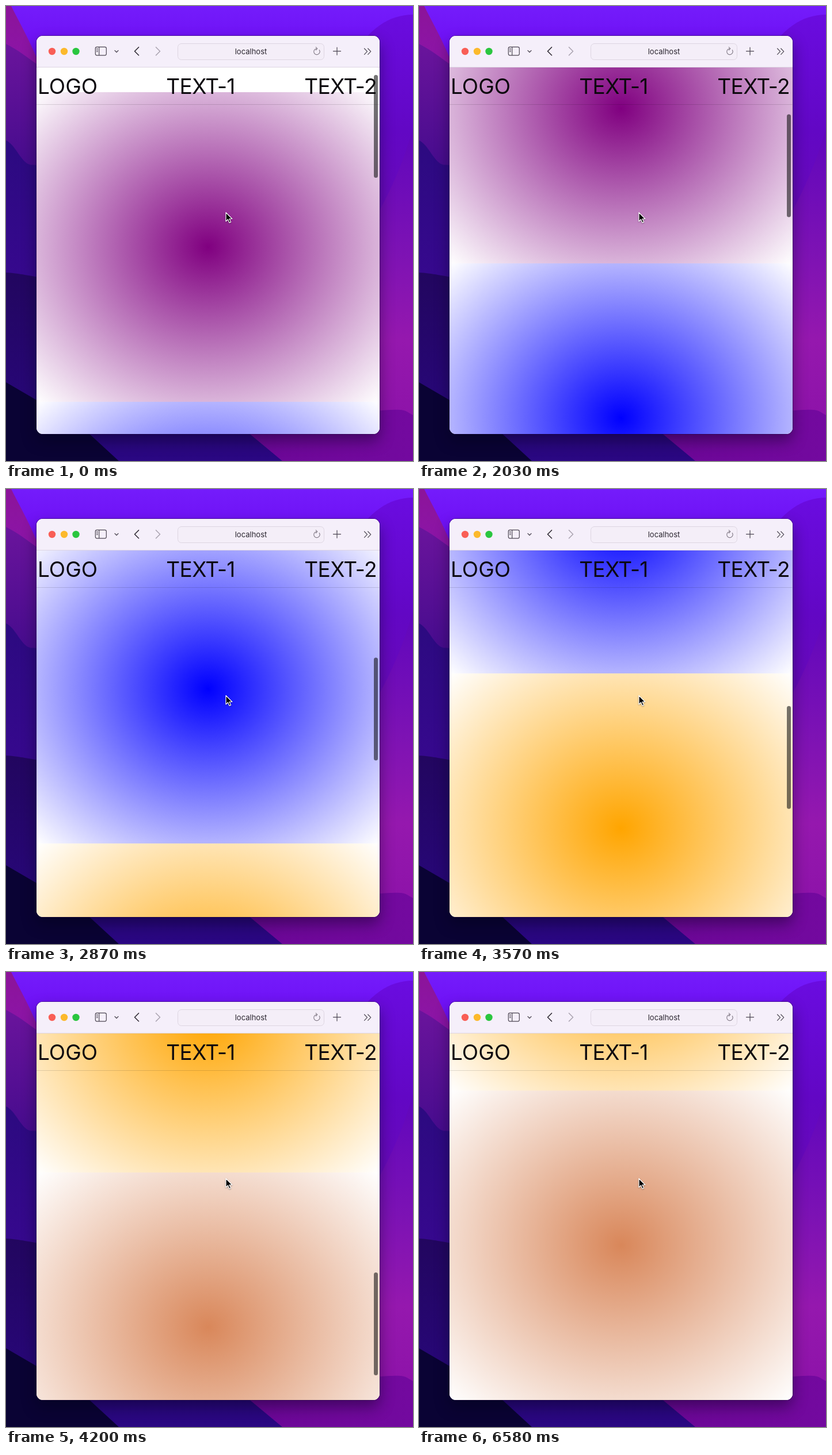
Animation of 707 by 792 pixels, one loop 6.65 s. Source, as an HTML page:

```html
<!DOCTYPE html>
<html lang="en">
<head>
<meta charset="utf-8">
<title>Sticky header scroll</title>
<style>
  html, body { margin: 0; width: 100%; height: 100%; overflow: hidden; background: #3a0898; }
  #stage { position: absolute; left: 0; top: 0; width: 707px; height: 792px; overflow: hidden; }
  svg { position: absolute; left: 0; top: 0; display: block; }
  #window {
    position: absolute; left: 53px; top: 52px; width: 595.5px; height: 693px;
    border-radius: 11px; overflow: hidden; background: #fff;
  }
  #shadow {
    position: absolute; left: 53px; top: 52px; width: 595.5px; height: 693px; border-radius: 11px;
    box-shadow: 0 0 0 1px rgba(20, 0, 50, .4), 0 12px 26px rgba(0, 0, 20, .42);
  }
  #view { position: absolute; left: 0; top: 55px; width: 100%; height: 638px; overflow: hidden; }
  #page { position: absolute; left: 0; top: 43px; width: 100%; will-change: transform; }
  #page div { height: 538.5px; background: radial-gradient(var(--c), #fff); }
  #bar { position: absolute; left: 0; top: 0; width: 100%; height: 54px; background: #f5effa; border-bottom: 1px solid #ddd5e2; }
  #thumb {
    position: absolute; left: 639px; top: 120px; width: 7px; height: 178.5px;
    border-radius: 3.5px; background: rgba(10, 10, 10, .56);
  }
  text { font-family: Inter, Roboto, "Liberation Sans", sans-serif; }
</style>
</head>
<body>
<div id="stage">
  <svg width="707" height="792">
    <defs>
      <linearGradient id="sky" x2="0" y2="1">
        <stop offset="0" stop-color="#741cfb"/><stop offset=".12" stop-color="#6c0bf2"/>
        <stop offset=".5" stop-color="#5c05b8"/><stop offset="1" stop-color="#38057e"/>
      </linearGradient>
      <linearGradient id="topRight" x2="0" y2="1">
        <stop offset="0" stop-color="#6a0ce0"/><stop offset=".5" stop-color="#6207c4"/>
        <stop offset="1" stop-color="#6a0bb4"/>
      </linearGradient>
      <linearGradient id="rightBand" x2="0" y2="1">
        <stop offset="0" stop-color="#5f06bd"/><stop offset=".4" stop-color="#7c12b4"/>
        <stop offset=".7" stop-color="#9518ae"/><stop offset="1" stop-color="#8c12a8"/>
      </linearGradient>
      <linearGradient id="leftPink" x2="0" y2="1">
        <stop offset="0" stop-color="#8c1499"/><stop offset="1" stop-color="#8b15b0"/>
      </linearGradient>
      <linearGradient id="leftPurple" x2="0" y2="1">
        <stop offset="0" stop-color="#6a149c"/><stop offset="1" stop-color="#430b8c"/>
      </linearGradient>
      <linearGradient id="leftIndigo" x2="0" y2="1">
        <stop offset="0" stop-color="#2c0a80"/><stop offset="1" stop-color="#37088f"/>
      </linearGradient>
      <linearGradient id="lowLeft" x2="0" y2="1">
        <stop offset="0" stop-color="#22065f"/><stop offset="1" stop-color="#2a0782"/>
      </linearGradient>
      <linearGradient id="lowRight">
        <stop offset="0" stop-color="#6b0796"/><stop offset="1" stop-color="#73099f"/>
      </linearGradient>
    </defs>
    <rect width="707" height="792" fill="url(#sky)"/>
    <path d="M600 90C630 40 665 15 707 15V420H600Z" fill="url(#topRight)"/>
    <path d="M707 212C694 260 675 310 640 372V740H707Z" fill="url(#rightBand)"/>
    <path d="M0 0H9C24 30 40 58 54 92V150H0Z" fill="url(#leftPink)"/>
    <path d="M0 66C20 76 38 90 60 106V300H0Z" fill="url(#leftPurple)"/>
    <path d="M0 234C14 240 22 262 34 272S50 270 60 284V500H0Z" fill="url(#leftIndigo)"/>
    <path d="M0 464C22 465 42 470 80 476L430 745L484 792H0Z" fill="url(#lowLeft)"/>
    <path d="M0 655L60 690L145 745L196 792H0Z" fill="#0a0334"/>
    <path d="M420 742C520 730 580 710 640 705S690 704 707 712V792H480Z" fill="url(#lowRight)"/>
  </svg>

  <div id="shadow"></div>
  <div id="window">
    <div id="view">
      <div id="page">
        <div style="--c:purple"></div>
        <div style="--c:blue"></div>
        <div style="--c:orange"></div>
        <div style="--c:#d9875a"></div>
      </div>
    </div>
    <div id="bar"></div>
  </div>

  <svg width="707" height="792" fill="none" stroke-linecap="round" stroke-linejoin="round">
    <circle cx="80" cy="79" r="6.2" fill="#f95e56"/>
    <circle cx="101" cy="79" r="6.2" fill="#fcb92c"/>
    <circle cx="121.5" cy="79" r="6.2" fill="#2ac63f"/>
    <g stroke="#4c4652" stroke-width="1.2">
      <rect x="155.3" y="71.3" width="19" height="14.5" rx="2.5"/>
      <path d="M161.7 71.5V85.5M157.5 74.3H159.3M157.5 76.8H159.3M157.5 79.3H159.3"/>
      <path d="M189 77.5L192 80.5L195 77.5"/>
      <path d="M575 72.2V85.2M568.5 78.7H581.5"/>
      <path d="M622.5 74L627.5 79.2L622.5 84.4M628.7 74L633.7 79.2L628.7 84.4"/>
    </g>
    <path d="M230.5 71.7L223.5 78.7L230.5 85.7" stroke="#2f2a34" stroke-width="1.6"/>
    <path d="M260.5 71.7L267.5 78.7L260.5 85.7" stroke="#aba4b1" stroke-width="1.6"/>
    <rect x="298.5" y="65.5" width="254" height="28" rx="6" fill="#f4eef8" stroke="#ddd5e1"/>
    <path d="M544.3 76.6A5.2 5.2 0 1 1 540 74.2M538.2 71.6L540.8 74.2L538.2 76.8" stroke="#807985" stroke-width="1.1"/>
    <text x="425.5" y="84.3" font-size="13" text-anchor="middle" fill="#29242e">localhost</text>
    <path d="M53 171.5H648.5" stroke="#000" stroke-opacity=".13" stroke-linecap="butt"/>
    <g fill="#0c090e" font-size="37">
      <text x="55" y="153">LOGO</text>
      <text x="338" y="153" text-anchor="middle" letter-spacing="-.6">TEXT-1</text>
      <text x="644" y="153" text-anchor="end" letter-spacing="-.6">TEXT-2</text>
    </g>
  </svg>
  <div id="thumb"></div>
  <svg width="707" height="792">
    <path d="M382 359.5V374.8L385.5 371.5L388 377.2L390.5 376.1L388 370.5H392.8Z"
      fill="#000" stroke="#fff" stroke-width="1.2" stroke-linejoin="round" style="filter:drop-shadow(0 1px 1px rgba(0,0,0,.35))"/>
  </svg>
</div>
<script>
  const LOOP = 6650, STEP = 70, THUMB_RATIO = 0.2844;
  const FADE_START = 5500, FADE_TIME = 300;
  // time in ms, scroll in px, speed in px per ms
  const KEYS = [
    [0, 0, 0], [1050, 64, .12], [2030, 241, .3], [2870, 610, .43],
    [3570, 906, .5], [4200, 1417, .5], [4800, 1559.5, 0], [LOOP, 1559.5, 0]
  ];
  const page = document.getElementById('page');
  const thumb = document.getElementById('thumb');

  // Cubic Hermite curve through the keys
  function scrollAt(t) {
    const i = KEYS.findIndex(k => k[0] > t);
    const [t0, s0, v0] = KEYS[i - 1], [t1, s1, v1] = KEYS[i];
    const d = t1 - t0, u = (t - t0) / d, w = 1 - u;
    return s0 * (1 + 2 * u) * w * w + v0 * d * u * w * w
         + s1 * u * u * (3 - 2 * u) - v1 * d * u * u * w;
  }

  function draw(time) {
    const t = Math.floor((time % LOOP) / STEP) * STEP;
    const y = scrollAt(t);
    page.style.transform = `translateY(${-y}px)`;
    thumb.style.transform = `translateY(${y * THUMB_RATIO}px)`;
    thumb.style.opacity = Math.min(1, Math.max(0, 1 - (t - FADE_START) / FADE_TIME));
  }

  const start = performance.now();
  function tick() {
    draw(performance.now() - start);
    requestAnimationFrame(tick);
  }
  draw(0);
  requestAnimationFrame(tick);
</script>
</body>
</html>
```
